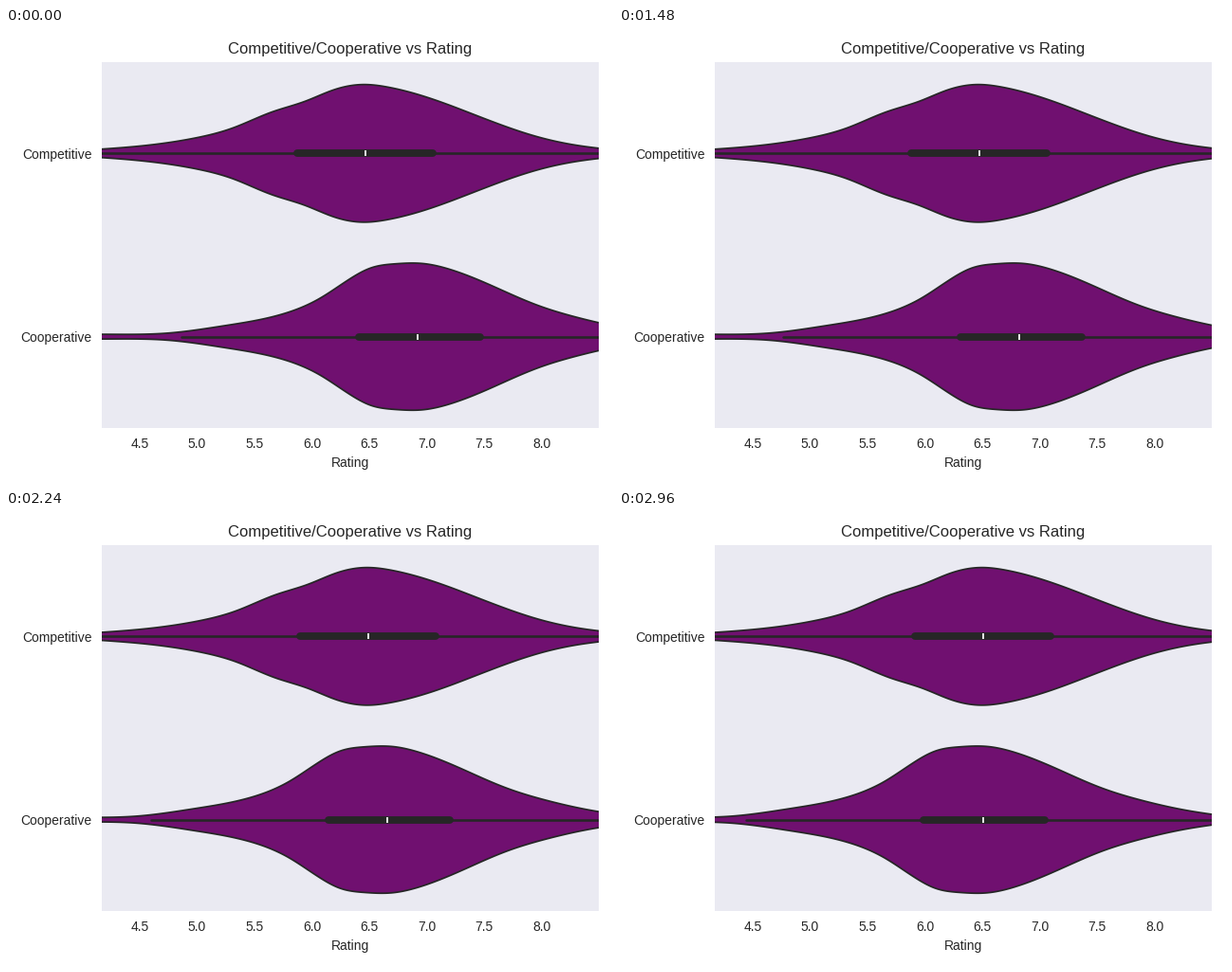
A matplotlib script that plays this animation: 640 by 480 pixels, repeating every 5 s.

```python
import numpy as np
import matplotlib.pyplot as plt
from matplotlib.animation import FuncAnimation
from matplotlib.patches import Polygon

W, H, DPI = 640, 480, 100
LEFT, RIGHT, TOP, BOTTOM = 100.6, 624.6, 35.55, 422.3
PURPLE, DARK = "#701070", "#262626"
LW = 1.25
HOLD, STEPS, FRAMES = 25, 49, 125

plt.rcParams.update({
    "font.family": "Liberation Sans",
    "font.size": 10,
    "text.color": DARK,
    "axes.labelcolor": DARK,
    "xtick.color": DARK,
    "ytick.color": DARK,
})

# Key points of each outline: stage x and half height, both in pixels
COMPETITIVE = [
    (61, 1.8), (141, 7.7), (201, 16.5), (240, 27.1), (280, 43.5),
    (315, 54.8), (345, 66.8), (377, 72.6), (402, 70), (445, 58.8),
    (500, 38.4), (560, 17.6), (600, 8.8), (660, 1.5),
]
COOPERATIVE = [
    (40, 2), (101, 2.5), (170, 3.7), (230, 11.5), (290, 23.4),
    (330, 39.9), (360, 59.3), (385, 72.6), (410, 76.8), (440, 77.1),
    (465, 71.9), (500, 59.1), (560, 33.3), (600, 20.9), (651, 9.5), (700, 2.2),
]


def spline(points):
    """Smooth cubic spline through the points, sampled once per pixel."""
    x, y = np.array(points, float).T
    d = np.diff(x)
    s = np.diff(y) / d
    a = np.eye(len(x))
    for i in range(1, len(x) - 1):
        a[i, i - 1:i + 2] = d[i], 2 * (d[i - 1] + d[i]), d[i - 1]
    m = np.linalg.solve(
        a, np.r_[s[0], 3 * (d[1:] * s[:-1] + d[:-1] * s[1:]), s[-1]])

    xs = np.arange(x[0], x[-1])
    i = np.searchsorted(x, xs, side="right") - 1
    t = (xs - x[i]) / d[i]
    bend = (1 - t) * (m[i] - s[i]) - t * (m[i + 1] - s[i])
    return xs, y[i] + t * d[i] * (s[i] + (1 - t) * bend)


class Violin:
    def __init__(self, ax, y, points, whisker, box, median, travel):
        xs, half = spline(points)
        self.travel = travel
        self.outline = np.column_stack([np.r_[xs, xs[::-1]],
                                        np.r_[y - half, (y + half)[::-1]]])
        self.body = Polygon(self.outline, fc=PURPLE, ec=DARK, lw=LW)
        ax.add_patch(self.body)
        self.parts = []
        for span, width in ((whisker, LW * 1.5), (box, LW * 4.5)):
            line, = ax.plot(span, [y, y], color=DARK, lw=width,
                            solid_capstyle="round")
            self.parts.append((line, np.array(span)))
        mark, = ax.plot([median], [y], "|", color="white",
                        ms=LW * 4.5 / 1.2, mew=LW)
        self.parts.append((mark, np.array([median])))

    def move(self, p):
        dx = self.travel * p
        self.body.set_xy(self.outline + [dx, 0])
        for line, base in self.parts:
            line.set_xdata(base + dx)
        return [self.body] + [line for line, _ in self.parts]


fig = plt.figure(figsize=(W / DPI, H / DPI), dpi=DPI, facecolor="white")
ax = fig.add_axes([LEFT / W, 1 - BOTTOM / H,
                   (RIGHT - LEFT) / W, (BOTTOM - TOP) / H],
                  facecolor="#EAEAF2")
for spine in ax.spines.values():
    spine.set_visible(False)

quarter = (BOTTOM - TOP) / 4
rows = (TOP + quarter, TOP + 3 * quarter)
violins = [
    Violin(ax, rows[0], COMPETITIVE, (60, 700), (307, 449.7), 379.2, 5.0),
    Violin(ax, rows[1], COOPERATIVE, (185, 720), (372, 500), 434.5, -50.8),
]

ax.set_xlim(LEFT, RIGHT)
ax.set_ylim(BOTTOM, TOP)
ax.set_xticks(140.9 + 60.57 * np.arange(8),
              [f"{4.5 + 0.5 * i:.1f}" for i in range(8)])
ax.set_yticks(rows, ["Competitive", "Cooperative"])
ax.tick_params(axis="x", length=0, pad=7)
ax.tick_params(axis="y", length=0, pad=7.4)
ax.set_xlabel("Rating")
ax.set_title("Competitive/Cooperative vs Rating", fontsize=12)


def update(k):
    p = min(max(k - HOLD, 0), STEPS) / STEPS
    return [artist for v in violins for artist in v.move(p)]


anim = FuncAnimation(fig, update, frames=FRAMES, interval=40,
                     init_func=lambda: update(0), repeat=True, repeat_delay=0)
plt.show()
```
